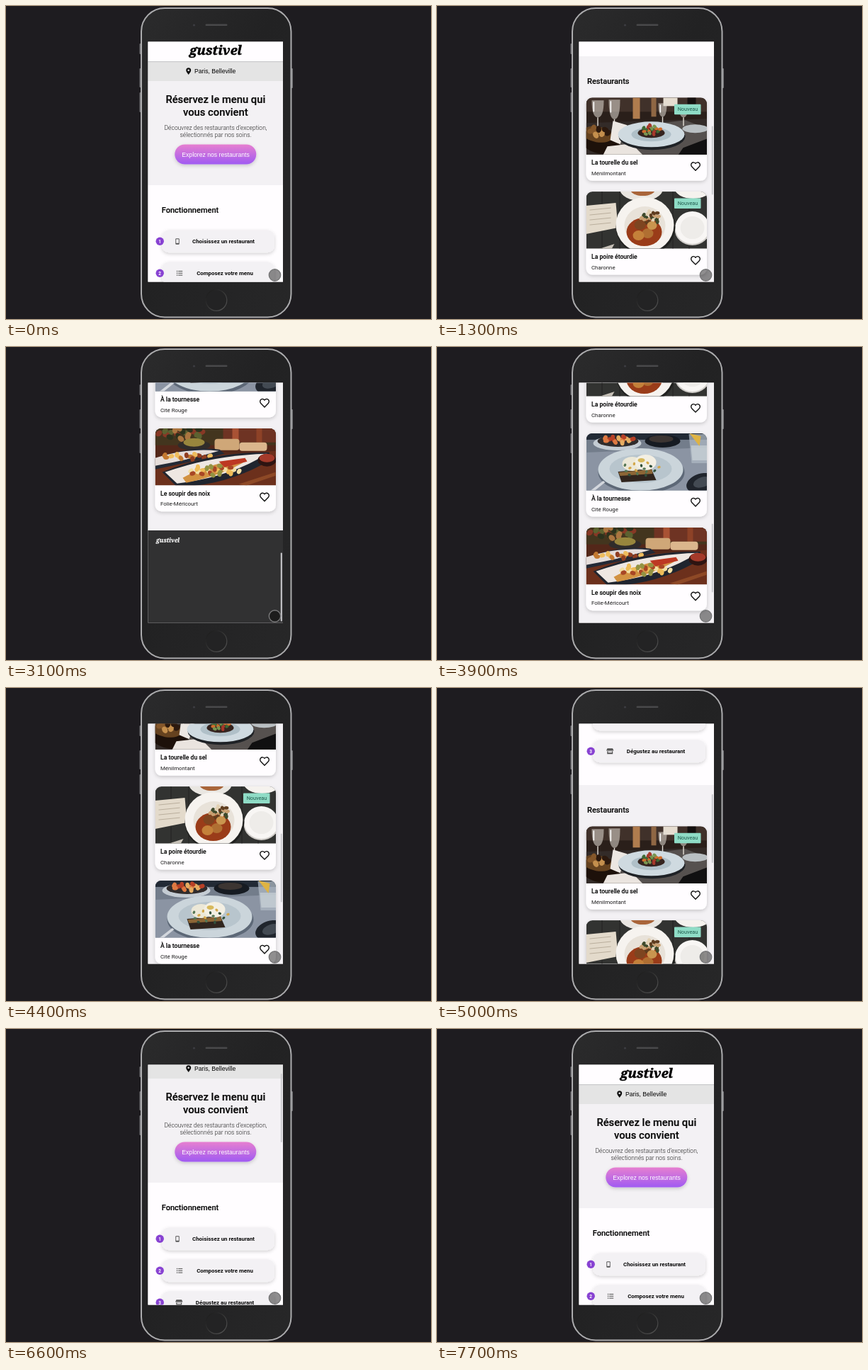
An HTML page that plays this animation: 600x442 px, repeating every 7800 ms.

```html
<!DOCTYPE html>
<html lang="fr">
<head>
<meta charset="utf-8">
<title>Restaurants</title>
<style>
  html, body { margin: 0; width: 100%; height: 100%; overflow: hidden; background: #1e1c20; }
  svg { display: block; width: 600px; height: 442px; font-family: Roboto, sans-serif; }
  .c { text-anchor: middle; }
  .sans { font-family: "Liberation Sans", Arial, sans-serif; }
  .logo { font-family: "Noto Serif", serif; font-weight: 900; font-style: italic; }
  .h { font-size: 11.05px; font-weight: 500; fill: #080808; stroke: #080808; stroke-width: .15px; }
  .title { font-size: 14.75px; font-weight: 500; fill: #080808; stroke: #080808; stroke-width: .2px; }
  .lead { font-size: 8.5px; font-weight: 300; fill: #222; }
  .step { font-size: 7.9px; font-weight: 700; fill: #080808; }
  .num { font-size: 6.4px; font-weight: 700; fill: #fff; }
  .name { font-size: 8.6px; font-weight: 500; fill: #080808; stroke: #080808; stroke-width: .12px; }
  .area { font-size: 7.85px; fill: #1a1a1a; }
  .tag { font-size: 7.3px; fill: #1f5a4c; }
</style>
</head>
<body>
<svg viewBox="0 0 600 442">
  <defs>
    <linearGradient id="body" x1="0" y1="0" x2="1" y2="1">
      <stop offset="0" stop-color="#2b2b2c"/>
      <stop offset=".45" stop-color="#222223"/>
      <stop offset="1" stop-color="#272728"/>
    </linearGradient>
    <linearGradient id="home" x1="0" y1="0" x2="1" y2="1">
      <stop offset="0" stop-color="#161616"/>
      <stop offset="1" stop-color="#585858"/>
    </linearGradient>
    <linearGradient id="cta" x1="0" y1="0" x2="0" y2="1">
      <stop offset="0" stop-color="#e67fd0"/>
      <stop offset="1" stop-color="#a05af2"/>
    </linearGradient>
    <filter id="shade" x="-10%" y="-20%" width="120%" height="150%">
      <feDropShadow dx="0" dy="2" stdDeviation="2.4" flood-color="#000" flood-opacity=".18"/>
    </filter>
    <clipPath id="screen"><rect x="200.5" y="50.6" width="190.5" height="338.8"/></clipPath>
    <clipPath id="photo"><path d="M0 80.5V9a9 9 0 0 1 9-9h152.5a9 9 0 0 1 9 9v71.5z"/></clipPath>
  </defs>

  <rect width="600" height="442" fill="#1e1c20"/>
  <g fill="#77777a">
    <rect x="188.5" y="53" width="2.5" height="15" rx="1"/>
    <rect x="188.5" y="88" width="2.5" height="27" rx="1"/>
    <rect x="188.5" y="122" width="2.5" height="28" rx="1"/>
    <rect x="402.5" y="88" width="2.5" height="28" rx="1"/>
  </g>
  <rect x="191" y="3" width="211.5" height="436.5" rx="33" fill="url(#body)" stroke="#acacae" stroke-width="2"/>
  <rect x="281.5" y="25.5" width="31" height="2.6" rx="1.3" fill="#49494b"/>
  <circle cx="265.5" cy="27" r="1.6" fill="#3d3d42"/>
  <circle cx="297" cy="415.5" r="14.8" fill="#232324" stroke="url(#home)" stroke-width="1.2"/>

  <g clip-path="url(#screen)">
    <rect x="200" y="50" width="192" height="340" fill="#f3f1f4"/>
    <g id="page"></g>
    <rect id="thumb" x="387.8" width="2" height="97" rx="1" fill="#cbcbcf"/>
    <circle cx="379.5" cy="380" r="8.2" fill="#000" fill-opacity=".44" stroke="#787879" stroke-width="1.4"/>
  </g>
</svg>
<script>
const page = document.getElementById('page');
const thumb = document.getElementById('thumb');
const WHITE = '#fffdff', PALE = '#f3f1f4';

const text = (x, y, cls, str, extra = '') => `<text x="${x}" y="${y}" class="${cls}" ${extra}>${str}</text>`;
const rect = (x, y, w, h, fill, extra = '') => `<rect x="${x}" y="${y}" width="${w}" height="${h}" fill="${fill}" ${extra}/>`;
const oval = (x, y, rx, ry, fill, turn = 0) =>
  `<ellipse cx="${x}" cy="${y}" rx="${rx}" ry="${ry}" fill="${fill}" transform="rotate(${turn} ${x} ${y})"/>`;
const path = (d, fill, extra = '') => `<path d="${d}" fill="${fill}" ${extra}/>`;

// Small loose pieces of food around a point
function bits(x, y, rx, ry, colors, count, size) {
  let out = '';
  for (let i = 0; i < count; i++) {
    const a = i * 2.4, r = Math.sqrt((i + .5) / count);
    out += oval(x + rx * r * Math.cos(a), y + ry * r * Math.sin(a), size, size * .75, colors[i % colors.length], i * 40);
  }
  return out;
}

const goblet = (x, y, w, h) =>
  path(`M${x} ${y}h${w}q0 ${h * .6} ${-w / 2} ${h * .6}q${-w / 2} 0 ${-w / 2} ${-h * .6}z`, '#e2dcd3', 'opacity=".55"') +
  rect(x + 2, y + 2, 1.6, h * .35, '#fff') +
  rect(x + w / 2 - .7, y + h * .6, 1.4, h * .4, '#e6e0d8');

const photos = [
  () => rect(0, 0, 171, 81, '#2a1f1a') +
    rect(0, 0, 171, 20, '#40312a') + rect(66, 0, 10, 30, '#b07c4e') + rect(92, 0, 7, 27, '#8f6744') +
    rect(109, 0, 20, 12, '#e6ddd0') + rect(143, 0, 12, 24, '#15100f') +
    path('M0 36L171 30V81H0z', '#332b28') + path('M36 44L140 32L171 44V81H30z', '#56514f') +
    goblet(8, 4, 17, 40) + goblet(32, 3, 16, 46) + goblet(102, 8, 12, 32) + goblet(131, 10, 13, 30) +
    oval(20, 62, 28, 17, '#1d110a', 12) + oval(16, 52, 22, 11, '#65421f', 10) +
    bits(17, 48, 15, 6, ['#c48f4d', '#85572a', '#2c190e'], 9, 5) +
    path('M38 33L58 39L48 66L34 60z', '#ece7e2') + path('M30 69L64 65L80 81H24z', '#eae4df') +
    oval(93, 55, 47, 19, '#1f2226') + oval(92, 52, 47, 18, '#cfdae0') + oval(92, 52, 28, 10, '#b0c0c8') +
    oval(92, 50, 19, 7, '#35241f') + bits(92, 46, 14, 7, ['#3f6a34', '#d16d2d', '#789550', '#a6382a'], 16, 3) +
    oval(154, 44, 18, 6, '#b9bfc2') + path('M137 71L171 58V81H130z', '#111011'),
  () => rect(0, 0, 171, 81, '#323331') +
    [22, 47, 122, 145].map(x => rect(x, 0, 1, 81, '#222322')).join('') +
    path('M0 20L42 16L45 51L0 60z', '#e3dacb') +
    [26, 33, 40, 47].map(y => path(`M5 ${y}l30 -3`, 'none', 'stroke="#a89b88" stroke-width=".7"')).join('') +
    oval(78, -3, 30, 16, '#e9e6e1') + oval(80, -4, 18, 10, '#a9653a') +
    oval(151, -5, 26, 15, '#f5f2ee') + oval(150, 53, 25, 23, '#cfccc8') + oval(150, 51, 24, 23, '#f8f6f4') + oval(150, 51, 17, 16, '#eeece9') +
    oval(84, 50, 42, 39, '#20211f') + oval(83, 47, 41, 39, '#f6f3ef') + oval(83, 48, 29, 27, '#e8e2d9') +
    oval(82, 57, 25, 20, '#9a3c19') + bits(91, 37, 14, 10, ['#3e4a2b', '#c9a071', '#5f3d1f', '#e2d1b3'], 20, 3.2) +
    oval(76, 47, 8, 7, '#7e4520') + oval(87, 59, 8, 7, '#b06f32') + oval(74, 62, 8, 7, '#c4813a') + oval(93, 48, 7, 6, '#c9954f') +
    path('M40 74L18 81h18z', '#c7c1b8'),
  () => rect(0, 0, 171, 81, '#737d8b') + path('M0 27L171 20V81H0z', '#8b94a3') +
    rect(0, 0, 171, 9, '#222a35') + oval(44, 14, 34, 10, '#c4ccd3') + oval(45, 11, 29, 8, '#302c2c') +
    bits(45, 9, 22, 5, ['#dd7942', '#b74026', '#e6ad62'], 14, 4) +
    oval(108, 11, 25, 9, '#161b22') + oval(106, 8, 17, 5, '#3c3532') +
    path('M145 1H171V42H149z', '#aeb9c3', 'opacity=".75"') + path('M148 17H171V38H150z', '#d1d9dc', 'opacity=".6"') +
    path('M146 0L160 18L162 4z', '#dfb343') +
    oval(78, 55, 61, 30, '#5d6877') + oval(77, 51, 60, 30, '#cbd5db') + oval(77, 50, 44, 20, '#b8c5cd') +
    path('M45 54L92 50L99 66L50 69z', '#30251e') + path('M46 55L93 51L94 57L48 60z', '#8c6636') +
    oval(65, 43, 14, 10, '#ece8d7') + oval(84, 41, 15, 11, '#f3efe3') + oval(78, 38, 5, 3, '#d7b95c') +
    bits(77, 50, 28, 11, ['#547654', '#d3a74b', '#31503b'], 15, 2.3) +
    oval(162, 70, 21, 13, '#20252d', -18) + oval(164, 69, 13, 7, '#434a53', -18) + path('M6 81L24 67L27 69L12 81z', '#d3d7dd'),
  () => rect(0, 0, 171, 81, '#532719') + rect(0, 0, 171, 24, '#43351e') +
    bits(38, 7, 35, 8, ['#5c6130', '#873825', '#2c321d', '#aa7540'], 20, 5) +
    rect(96, 0, 75, 20, '#6e3323') + rect(109, 0, 9, 20, '#a95234') + rect(143, 0, 8, 20, '#8d4227') +
    path('M0 43L171 32V81H0z', '#6c301c') +
    oval(55, 24, 23, 7, '#302c2a') + oval(55, 20, 15, 6, '#98863d') +
    rect(84, 15, 35, 16, '#cfa778', 'rx="4"') + rect(119, 20, 39, 12, '#dbb68d', 'rx="4"') +
    path('M0 43Q46 25 91 30L98 36Q50 48 0 58z', '#242a36') + path('M0 42Q48 27 90 32Q50 44 0 53z', '#e5ddda') +
    bits(43, 40, 36, 4, ['#c37931', '#efbd5e', '#8f3d21'], 14, 4) +
    path('M10 62Q78 33 161 34L164 44Q103 81 31 83z', '#20252f') + path('M14 62Q82 38 158 36Q106 69 31 78z', '#eee7e2') +
    path('M39 70Q82 46 130 45Q97 66 44 77z', '#d29242') +
    bits(83, 60, 38, 7, ['#eebc58', '#f3dfa3', '#a84625', '#939343'], 24, 4) + path('M90 47L127 42L130 47L98 55z', '#bd3823') +
    oval(158, 45, 13, 9, '#2e1411') + oval(158, 42, 11, 6, '#a43a2a') + path('M118 79L170 62V67L129 81z', '#8e4926')
];

const icons = [
  rect(239.3, -4, 5.4, 8.4, '#555', 'rx="1"') + rect(240.2, -3, 3.6, 5.5, PALE),
  [-2.8, 0, 2.8].map(y => rect(240.8, y - .7, 1.5, 1.4, '#666') + rect(243.2, y - .6, 6, 1.2, '#666')).join(''),
  path('M240.5 -4h7.5l1.5 3.2h-10.5z', '#555') + path('M240.2 0h8v4h-8z', '#555') + rect(241.5, .2, 5.5, 1.7, PALE)
];

const steps = ['Choisissez un restaurant', 'Composez votre menu', 'Dégustez au restaurant'];
const cards = [
  ['La tourelle du sel', 'Ménilmontant', true],
  ['La poire étourdie', 'Charonne', true],
  ['À la tournesse', 'Cité Rouge', false],
  ['Le soupir des noix', 'Folie-Méricourt', false]
];

const step = (label, i) => `<g transform="translate(0 ${332.3 + i * 45})">` +
  rect(220, -16, 159, 32, PALE, 'rx="10" filter="url(#shade)"') +
  oval(217.2, 0, 5.7, 5.7, '#8842d2') + text(217.2, 2.3, 'num c', i + 1) +
  icons[i] + text(i ? 309 : 307, 2.8, 'step c', label) + '</g>';

const heart = path('M154.5 103l-5.1-5.2c-3.6-3.8 1.7-8.9 5.1-4.7c3.4-4.2 8.7 .9 5.1 4.7z', 'none',
  'stroke="#111" stroke-width="1.4" stroke-linejoin="round"');

const card = ([name, area, isNew], i) => `<g transform="translate(210.5 ${528.3 + i * 132.8})">` +
  rect(0, 0, 170.5, 117.5, WHITE, 'rx="9" filter="url(#shade)"') +
  `<g clip-path="url(#photo)">${photos[i]()}</g>` +
  (isNew ? rect(124.5, 9.5, 37.5, 14.5, '#8fdcc6', 'rx="1"') + text(143.5, 19.2, 'tag c', 'Nouveau') : '') +
  text(7.5, 95, 'name', name) + text(7.5, 109.8, 'area', area) + heart + '</g>';

page.innerHTML =
  rect(200, 79, 192, 27, '#e4e4e4') + rect(200, 50, 192, 28, WHITE) + rect(200, 78, 192, 1.2, '#c9c9cb') +
  text(296, 69.3, 'logo c', 'gustivel', 'font-size="18.5" stroke="#000" stroke-width=".5"') +
  path('M257.7 97c-1.3-2.2-3.5-4-3.5-6.3a3.5 3.5 0 0 1 7 0c0 2.3-2.2 4.1-3.5 6.3z', '#111') +
  oval(257.7, 90.7, 1.3, 1.3, '#e4e4e4') +
  text(266, 95, 'sans', 'Paris, Belleville', 'font-size="8.6"') +
  rect(200, 106, 192, 147, PALE) +
  text(295.8, 137.2, 'title c', 'Réservez le menu qui') + text(295.8, 154.8, 'title c', 'vous convient') +
  text(296, 175, 'lead c', 'Découvrez des restaurants d’exception,') + text(296, 185, 'lead c', 'sélectionnés par nos soins.') +
  rect(238.3, 195.5, 115, 28, 'url(#cta)', 'rx="14" filter="url(#shade)"') +
  text(296, 212.8, 'sans c', 'Explorez nos restaurants', 'font-size="8.63" fill="#fff"') +
  rect(200, 253, 192, 217, WHITE) +
  text(219.7, 292, 'h', 'Fonctionnement') + steps.map(step).join('') +
  rect(200, 470, 192, 601, PALE) +
  text(212, 509, 'h', 'Restaurants') + cards.map(card).join('') +
  rect(200, 1071, 192, 140, '#313132') +
  text(212, 1088, 'logo', 'gustivel', 'font-size="8.3" fill="#fff" stroke="#fff" stroke-width=".2"');

// [time in ms, scroll in px]
const track = [[0, 0], [1300, 399], [2300, 704], [2800, 812], [3250, 812], [3900, 672],
  [5000, 333], [5800, 134], [6400, 58], [7100, 0], [7800, 0]];
const LOOP = 7800, TICK = 100;

const slope = i => (track[i + 1][1] - track[i][1]) / (track[i + 1][0] - track[i][0]);
const tangents = track.map((_, i) => {
  if (i === 0) return .2;
  if (i === track.length - 1) return 0;
  const a = slope(i - 1), b = slope(i);
  return a * b > 0 ? 2 * a * b / (a + b) : 0;
});

// Monotone cubic through the track
function scrollAt(t) {
  let i = 0;
  while (i < track.length - 2 && t >= track[i + 1][0]) i++;
  const [t0, y0] = track[i], [t1, y1] = track[i + 1];
  const d = t1 - t0, u = (t - t0) / d, v = 1 - u;
  return v * v * (1 + 2 * u) * y0 + u * u * (3 - 2 * u) * y1 +
    d * u * v * (v * tangents[i] - u * tangents[i + 1]);
}

function draw() {
  const t = Math.floor((performance.now() % LOOP) / TICK) * TICK;
  const y = Math.round(scrollAt(t));
  page.setAttribute('transform', `translate(0 ${-y})`);
  thumb.setAttribute('y', 52.5 + y * .293);
  thumb.setAttribute('opacity', t < TICK ? 0 : Math.max(0, Math.min(1, (7500 - t) / 300)));
  requestAnimationFrame(draw);
}
draw();
</script>
</body>
</html>
```
